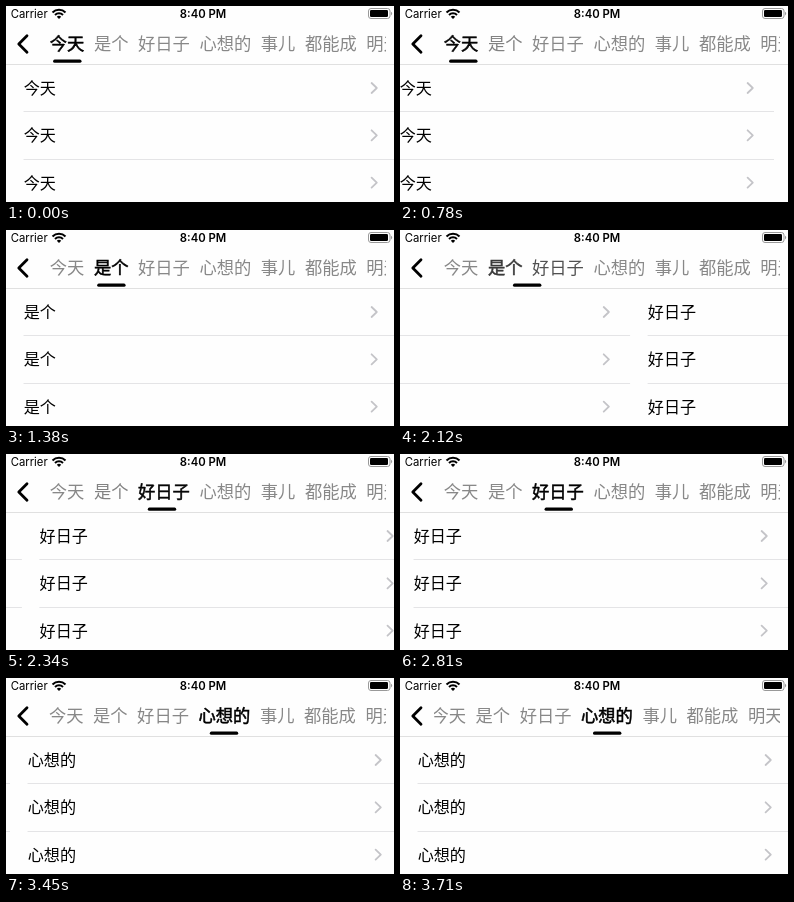
Write an HTML page that moves like this. It is 388 px wide and 196 px high and loops after 4340 ms.

```html
<!DOCTYPE html>
<html lang="zh-CN">
<head>
<meta charset="utf-8">
<style>
  html, body { margin: 0; width: 100%; height: 100%; overflow: hidden; background: #fefefe; }
  svg { display: block; width: 388px; height: 196px; }
  text { font-family: 'Noto Sans CJK SC', 'Noto Sans CJK', sans-serif; }
  .status { font: 11.3px Inter, sans-serif; }
  .line { fill: none; stroke-linecap: round; stroke-linejoin: round; }
</style>
</head>
<body>
<svg viewBox="0 0 388 196">
  <clipPath id="barClip"><rect x="34" y="20" width="346" height="38"/></clipPath>

  <text class="status" x="4.7" y="12">Carrier</text>
  <g fill="none" stroke="#000" stroke-width="2">
    <path d="M46.5 6.5a9.2 9.2 0 0 1 13 0M49 9a5.7 5.7 0 0 1 8 0"/>
    <path d="M53 13l-2.2-2.2a3.1 3.1 0 0 1 4.4 0z" fill="#000" stroke="none"/>
  </g>
  <text class="status" x="197" y="12" text-anchor="middle" style="font-weight:600">8:40 PM</text>
  <rect x="362.5" y="2.5" width="21.5" height="10" rx="2.5" fill="none" stroke="#999"/>
  <rect x="364" y="4" width="18" height="7" rx="1.3"/>
  <path d="M385 5.8q2.4 1.7 0 3.6z" fill="#999"/>

  <path class="line" d="M21 29.7L12.8 38l8.2 8.3" stroke="#000" stroke-width="2.8"/>
  <g clip-path="url(#barClip)"><g id="bar">
    <rect id="mark" y="53.6" width="28.4" height="3.2" rx="1.6"/>
  </g></g>
  <path d="M0 58.5H388" stroke="#e0e0e0"/>
  <g id="pages"></g>
</svg>

<script>
const names = ['今天', '是个', '好日子', '心想的', '事儿', '都能成', '明天'];
const PAGE = 392, LOOP = 4340, SIZE = 17.3, GAP = 9.5, GREY = 136;
const $ = id => document.getElementById(id);
const bar = $('bar'), mark = $('mark'), pages = $('pages');

function add(parent, tag, attrs, text = '') {
  const el = document.createElementNS('http://www.w3.org/2000/svg', tag);
  for (const key in attrs) el.setAttribute(key, attrs[key]);
  el.textContent = text;
  return parent.appendChild(el);
}

let left = 43.8;
const tabs = names.map(name => {
  const el = add(bar, 'text', { x: left, y: 44.1, 'font-size': SIZE }, name);
  const width = name.length * SIZE, center = left + width / 2;
  left += width + GAP;
  return { el, center };
});

names.slice(0, 4).forEach((name, i) => {
  const page = add(pages, 'g', { transform: `translate(${i * PAGE})` });
  for (let row = 0; row < 3; row++) {
    const y = 82 + row * 47.3;
    add(page, 'text', { x: 17.7, y: y + 6.1, 'font-size': 16.1 }, name);
    add(page, 'path', { class: 'line', d: `M365.6 ${y - 5}l5.2 5l-5.2 5`, stroke: '#c4c4c8', 'stroke-width': 1.8 });
    if (row < 2) add(page, 'path', { d: `M17.5 ${105.5 + row * 48}H${PAGE}`, stroke: '#e4e4e6' });
  }
});

// touch: first small drag; go: jump to `from`; end: page settled
const swipes = [
  { touch: 780, drag: 18, go: 1070, from: 0.42, end: 1380 },
  { touch: 1800, drag: 5, go: 2120, from: 0.413, end: 2460 },
  { touch: 2810, drag: 4, go: 3160, from: 0.478, end: 3540 }
];
const clamp = v => Math.min(1, Math.max(0, v));
const mix = (a, b, k) => a + (b - a) * k;

function swipeAt(s, t) {
  if (t < s.touch) return 0;
  if (t < s.go) return s.drag / PAGE;
  const start = s.go + 50;
  return mix(1, s.from, (1 - clamp((t - start) / (s.end - start))) ** 3);
}

function draw(now) {
  const t = now % LOOP;
  const pos = swipes.reduce((sum, s) => sum + swipeAt(s, t), 0);
  pages.setAttribute('transform', `translate(${-pos * PAGE})`);

  const i = Math.floor(pos);
  mark.setAttribute('x', mix(tabs[i].center, tabs[i + 1].center, pos - i) - 14);
  // colour fades with the drag, weight follows the nearest page
  tabs.forEach(({ el }, n) => {
    const c = Math.round(GREY * clamp(Math.abs(pos - n)));
    el.style.fill = el.style.stroke = `rgb(${c},${c},${c})`;
    el.style.strokeWidth = n === Math.round(pos) ? 0.5 : 0;
  });

  // center the last chosen tab in the bar
  const k = clamp((t - 3400) / 310);
  bar.setAttribute('transform', `translate(${(207 - tabs[3].center) * k * k * (3 - 2 * k)})`);
}

const begin = performance.now();
(function frame() {
  draw(performance.now() - begin);
  requestAnimationFrame(frame);
})();
</script>
</body>
</html>
```
